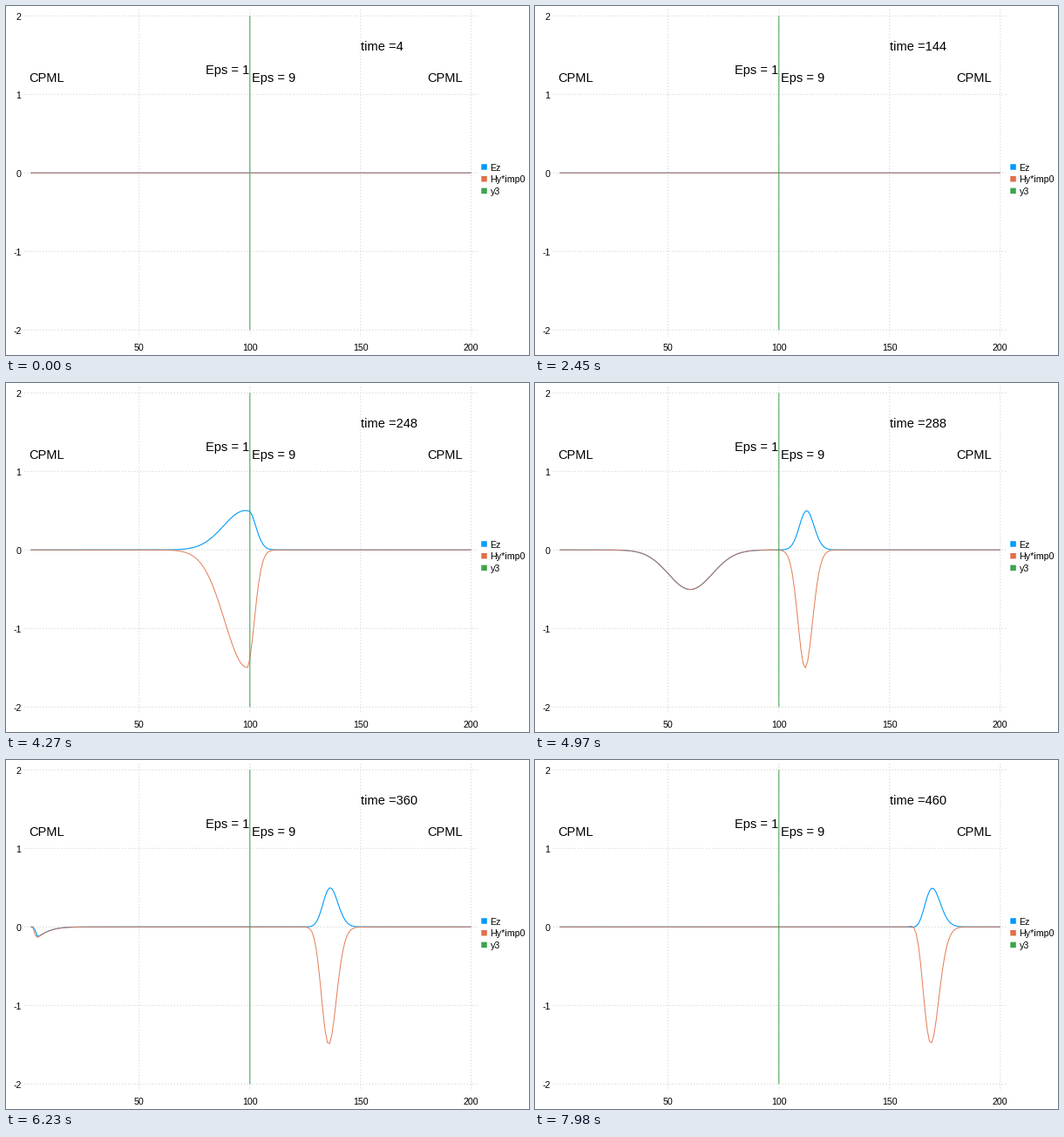
Animation of 600 by 400 pixels, one loop 8 s. Source, as a matplotlib script:

```python
import numpy as np
import matplotlib.pyplot as plt
from matplotlib.animation import FuncAnimation
from matplotlib.patches import Rectangle

W, H, DPI = 600, 400, 100
PT = 72 / DPI              # points per pixel
LOOP, TICK, HOLD = 8000, 20, 70

BLUE, ORANGE, GREEN = "#009afa", "#e26f46", "#3da44d"
N = 200                    # cells
SOURCE, SLAB = 50, 100     # wave entry and dielectric interface
EPS = 9.0
PML_EDGE, PML_GAIN = 6.0, 0.045


def pulse(t):
    return np.exp(-(t - 200.0) ** 2 / 200.0)


def decay(x):
    """Recursive-convolution factor of the absorbing layer at x."""
    depth = np.clip(PML_EDGE - x, 0, None)
    return np.exp(-PML_GAIN * depth ** 3)


def simulate(last, every=4):
    """1D FDTD at unit Courant number; returns (Ez, Hy*imp0) snapshots."""
    ez, hy = np.zeros(N + 1), np.zeros(N + 1)      # index 0 is unused
    psi_e, psi_h = np.zeros(N + 1), np.zeros(N + 1)
    x = np.arange(N + 1.0)
    be, bh = decay(x), decay(x + 0.5)
    eps = np.where(x >= SLAB, EPS, 1.0)
    inner, left = slice(2, N), slice(1, N)
    shots = []
    for t in range(1, last + 1):
        d = ez[2:] - ez[1:-1]
        psi_h[left] = bh[left] * psi_h[left] + (bh[left] - 1) * d
        hy[left] += d + psi_h[left]
        hy[SOURCE - 1] -= pulse(t)

        d = hy[2:N] - hy[1:N - 1]
        psi_e[inner] = be[inner] * psi_e[inner] + (be[inner] - 1) * d
        ez[inner] += (d + psi_e[inner]) / eps[inner]
        ez[SOURCE] += pulse(t + 1)
        if t % every == 0:
            shots.append((ez[1:].copy(), hy[1:].copy()))
    return shots


def px(x):
    return 25.8 + 2.54 * x


def py(y):
    return 191.3 - 90 * y


fig = plt.figure(figsize=(W / DPI, H / DPI), dpi=DPI, facecolor="white")
ax = fig.add_axes([0, 0, 1, 1])
ax.set_xlim(0, W)
ax.set_ylim(H, 0)
ax.axis("off")


def label(x, y, s, size, ha="left"):
    return ax.text(x, y, s, fontsize=size * PT, family="Liberation Sans",
                   color="black", ha=ha, va="baseline", zorder=5)


def line(xs, ys, color, width=1.0, **kw):
    return ax.plot(xs, ys, color=color, lw=width * PT, snap=False,
                   solid_capstyle="butt", **kw)[0]


SMALL, BIG = 10.67, 14.67
grid = dict(color="#d9d9d9", linestyle=(0, (1.5, 2)), zorder=1)
for v in (50, 100, 150, 200):
    line([px(v)] * 2, [4, 379], **grid)
    label(px(v), 395, str(v), SMALL, "center")
for v in range(-2, 3):
    line([21, 541], [py(v)] * 2, **grid)
    label(17.5, py(v) + 4.2, str(v), SMALL, "right")

cells = px(np.arange(1, N + 1))
flat = np.full(N, py(0))
ez_line = line(cells, flat, BLUE, 1.1, zorder=2)
hy_line = line(cells, flat, ORANGE, 1.0, zorder=3, alpha=0.9)
line([px(100)] * 2, [py(2), py(-2)], GREEN, zorder=4)

label(px(0), 87, "CPML", BIG)
label(px(180), 87, "CPML", BIG)
label(px(80), 78, "Eps = 1", BIG)
label(281.8, 87, "Eps = 9", BIG)
clock = label(px(150), 51, "time =4", BIG)

for i, (name, color) in enumerate([("Ez", BLUE), ("Hy*imp0", ORANGE), ("y3", GREEN)]):
    mid = 184.5 + 13.7 * i
    ax.add_patch(Rectangle((545.3, mid - 3.25), 6.5, 6.5, color=color, lw=0,
                           snap=False))
    label(555.6, mid + 4.3, name, SMALL)

shots = simulate(4 * (LOOP // HOLD + 1))


def draw(n):
    k = (n * TICK + TICK // 2) // HOLD
    ez, hy = shots[k]
    ez_line.set_ydata(py(ez))
    hy_line.set_ydata(py(hy))
    clock.set_text(f"time ={4 * (k + 1)}")
    return ez_line, hy_line, clock


anim = FuncAnimation(fig, draw, frames=LOOP // TICK, interval=TICK,
                     init_func=lambda: draw(0), repeat=True, repeat_delay=0)
plt.show()
```
